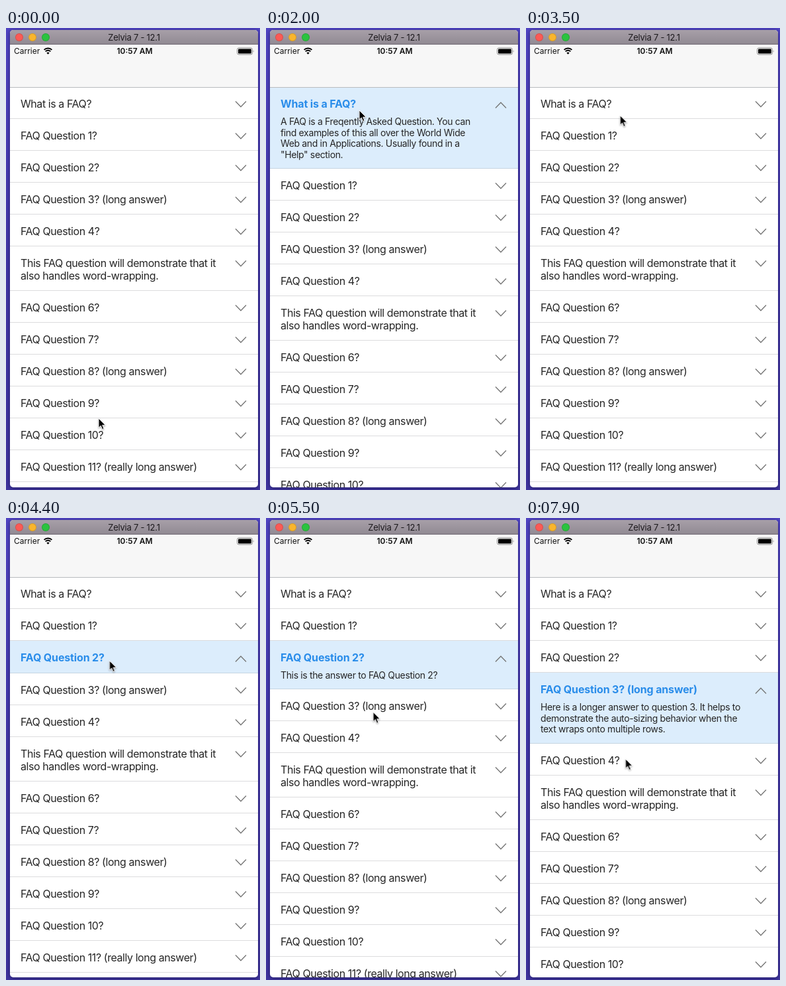
These frames come from a looping animation (384x696 px, 8 s). An HTML page:

```html
<!DOCTYPE html>
<html lang="en">
<head>
<meta charset="utf-8">
<title>FAQ list</title>
<style>
html, body { margin: 0; width: 100%; height: 100%; overflow: hidden; }
body {
  position: relative;
  background: linear-gradient(#5145c4, #4338a8 50%, #40369f);
  font-family: Inter, "Liberation Sans", sans-serif;
  -webkit-font-smoothing: antialiased;
}
.window {
  position: absolute; left: 6px; top: 3px; width: 375px; height: 689px;
  border-radius: 5px; overflow: hidden; background: #fff;
}
.shade {
  position: absolute; left: 6px; top: 3px; width: 375px; height: 689px;
  border-radius: 5px; box-shadow: 0 1px 6px rgba(10, 5, 50, .55);
}
.titlebar {
  position: absolute; inset: 0 0 auto; height: 22px; box-sizing: border-box;
  background: linear-gradient(#a79fa8, #918a93);
  border-bottom: 1px solid #6f6872;
}
.titlebar i {
  position: absolute; top: 5px; width: 12px; height: 12px; border-radius: 50%;
  box-shadow: inset 0 0 0 1px rgba(0, 0, 0, .14);
}
.titlebar b {
  position: absolute; left: 0; width: 100%; top: 3px; text-align: center;
  font-weight: 400; font-size: 13px; line-height: 17px; letter-spacing: -.25px; color: #1d1a1e;
}
.navbar {
  position: absolute; inset: 22px 0 auto; height: 64px; box-sizing: border-box;
  background: #f7f7f7; font-size: 12px; line-height: 20px; color: #111;
}
.navbar span { position: absolute; top: 0; }
.navbar svg { position: absolute; left: 0; top: 0; }
.list { position: absolute; inset: 86px 0 0; }
.list::before {
  content: ""; position: absolute; z-index: 1; inset: 0 0 auto; height: 1px; background: #b9bcbe;
}

.row {
  --ink: #262626; --weight: 400; --track: -.43px; --flip: 1; --line: #dcdcde;
  position: relative; box-sizing: border-box; height: 48px;
  border-bottom: 1px solid var(--line);
}
.row.tall { height: 67px; }
.clip { position: absolute; inset: 0 0 8px; overflow: hidden; white-space: pre; }
.question {
  position: absolute; left: 16px; top: 16px; font-size: 16px; line-height: 19px;
  color: var(--ink); font-weight: var(--weight); letter-spacing: var(--track);
}
.answer {
  position: absolute; left: 16px; top: 44px; font-size: 14px; line-height: 16.7px;
  color: #262626; font-weight: 400; letter-spacing: -.35px;
}
.chevron {
  position: absolute; left: 339px; top: 19px; width: 20px; height: 15px;
  transform: scaleY(var(--flip));
  fill: none; stroke: #757575; stroke-width: 1.3;
}

/* Row heights ease; the highlight switches hard. */
.r0 { animation: grow0 8s infinite, mark0 8s infinite; }
.r2 { animation: grow2 8s infinite, mark2 8s infinite; }
.r3 { animation: grow3 8s infinite, mark3 8s infinite; }
.r0, .r2, .r3 { animation-timing-function: ease-in-out, step-end; }
@keyframes grow0 { 0%, 16.62%, 39.27%, to { height: 48px } 21%, 34.9% { height: 123px } }
@keyframes grow2 { 0%, 54.41%, 84.95%, to { height: 48px } 58.79%, 80.57% { height: 73px } }
@keyframes grow3 { 0%, 80.57% { height: 48px } 84.95%, to { height: 107px } }
@keyframes mark0 {
  0%, 34.9%, to { background: #fff; --ink: #262626; --weight: 400; --track: -.43px; --flip: 1; --line: #dcdcde }
  16.62% { background: #dcedfc; --ink: #2a8dea; --weight: 700; --track: -.15px; --flip: -1; --line: #c6d5e2 }
}
@keyframes mark2 {
  0%, 80.57%, to { background: #fff; --ink: #262626; --weight: 400; --track: -.43px; --flip: 1; --line: #dcdcde }
  54.41% { background: #dcedfc; --ink: #2a8dea; --weight: 700; --track: -.15px; --flip: -1; --line: #c6d5e2 }
}
@keyframes mark3 {
  0% { background: #fff; --ink: #262626; --weight: 400; --track: -.43px; --flip: 1; --line: #dcdcde }
  80.57%, to { background: #dcedfc; --ink: #2a8dea; --weight: 700; --track: -.15px; --flip: -1; --line: #c6d5e2 }
}

.cursor {
  position: absolute; left: -1px; top: -1px; width: 14px; height: 20px; overflow: visible;
  filter: drop-shadow(0 1px 1px rgba(0, 0, 0, .35));
  animation: point 8s ease-in-out infinite;
}
@keyframes point {
  0% { transform: translate(140px, 588px) }
  11.25%, 41.5% { transform: translate(141px, 124px) }
  52.5%, 60.5% { transform: translate(156.5px, 215px); animation-timing-function: ease-in }
  63.75% { transform: translate(158.5px, 240px); animation-timing-function: ease-out }
  68.5% { transform: translate(162px, 292.5px) }
  72.5%, 89% { transform: translate(163.5px, 285px) }
  98.5%, to { transform: translate(150.5px, 363px) }
}
</style>
</head>
<body>
<div class="shade"></div>
<div class="window">
  <div class="list"></div>
  <div class="navbar">
    <span style="left:6px">Carrier</span>
    <span style="left:0;width:377px;text-align:center;font-weight:600">10:57 AM</span>
    <svg width="375" height="20" fill="none" stroke="#000">
      <path d="M51.6 7.9a8.4 8.4 0 0 1 11.8 0M53.7 10.4a5.4 5.4 0 0 1 7.6 0" stroke-width="2"/>
      <path d="M57.5 14.8l-2.1-2.2a3 3 0 0 1 4.2 0z" fill="#000" stroke="none"/>
      <rect x="343.5" y="5" width="23" height="10" rx="2.5" stroke="#8a8a8a"/>
      <rect x="345" y="6.5" width="20" height="7" rx="1.2" fill="#000" stroke="none"/>
      <path d="M367.8 8.2q1.6 1.8 0 3.6z" fill="#777" stroke="none"/>
    </svg>
  </div>
  <div class="titlebar">
    <i style="left:8px;background:#fb5a55"></i>
    <i style="left:28px;background:#f9b52c"></i>
    <i style="left:48px;background:#2bc33f"></i>
    <b>Zelvia 7 - 12.1</b>
  </div>
</div>
<svg class="cursor" viewBox="-1 -1 14 20">
  <path d="M0 0V14.3L3.3 11.2L5.6 16.6L8 15.6L5.7 10.3H10.3Z" fill="#000" stroke="#fff" stroke-width="1"/>
</svg>
<script>
const faq = n => `FAQ Question ${n}?`;
const questions = [
  "What is a FAQ?", faq(1), faq(2), faq(3) + " (long answer)", faq(4),
  "This FAQ question will demonstrate that it\nalso handles word-wrapping.",
  faq(6), faq(7), faq(8) + " (long answer)", faq(9), faq(10), faq(11) + " (really long answer)"
];
const answers = {
  0: "A FAQ is a Freqently Asked Question. You can\nfind examples of this all over the World Wide\nWeb and in Applications. Usually found in a\n\"Help\" section.",
  2: "This is the answer to FAQ Question 2?",
  3: "Here is a longer answer to question 3. It helps to\ndemonstrate the auto-sizing behavior when the\ntext wraps onto multiple rows."
};
document.querySelector(".list").innerHTML = questions.map((q, i) => `
  <div class="row r${i}${q.includes("\n") ? " tall" : ""}">
    <div class="clip"><div class="question">${q}</div><div class="answer">${answers[i] || ""}</div></div>
    <svg class="chevron" viewBox="0 0 20 15"><path d="M2 2.5L10 10.8L18 2.5"/></svg>
  </div>`).join("");
</script>
</body>
</html>
```
